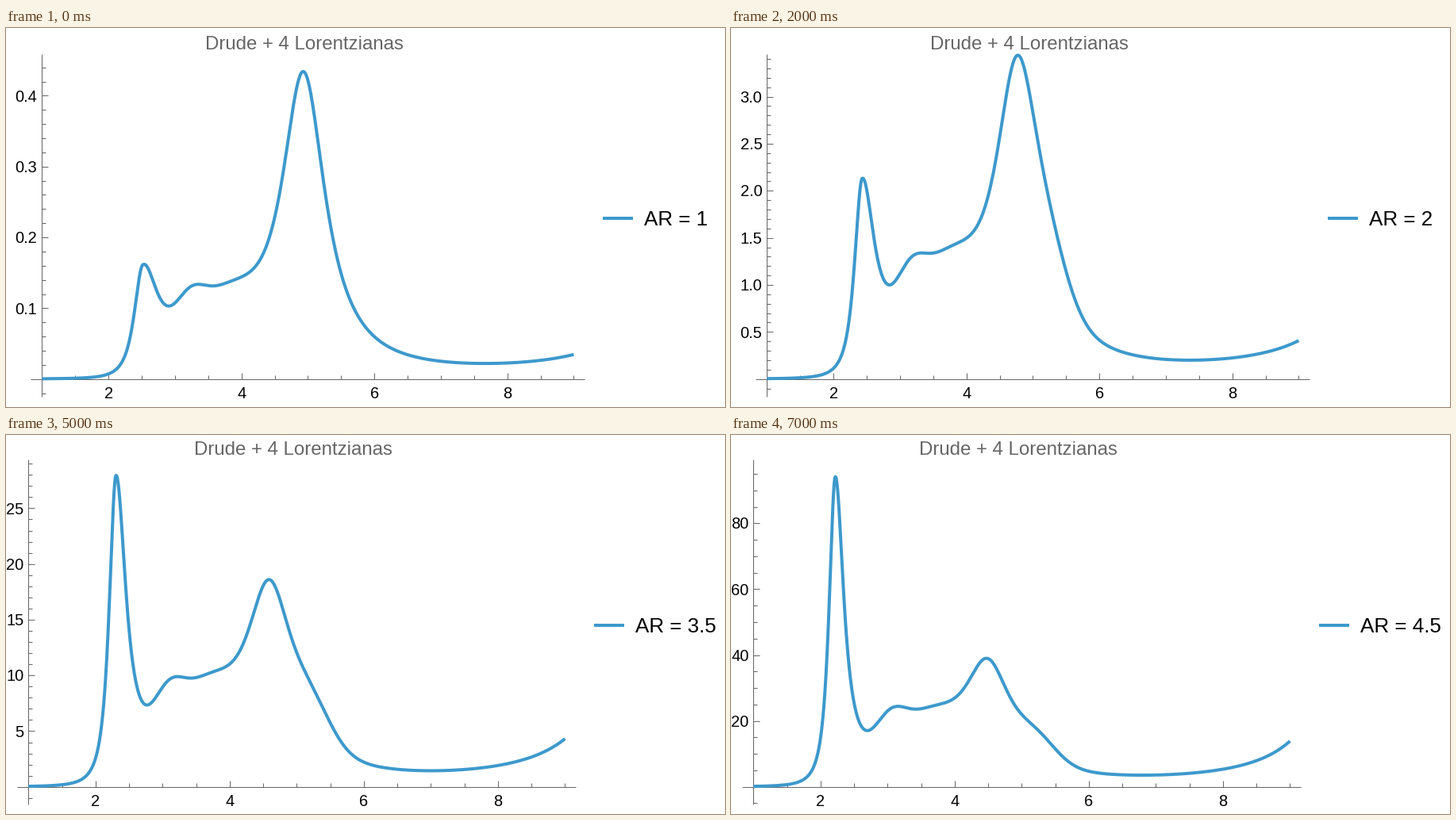
A matplotlib script for the animation above (8000 ms loop, 906 by 478 pixels).

```python
import numpy as np
import matplotlib.pyplot as plt
from matplotlib.animation import FuncAnimation

W, H, DPI = 906, 478, 100
PX = 72 / DPI
BLUE, GRAY = (0.24, 0.6, 0.8), "#666666"
plt.rcParams["font.family"] = "Liberation Sans"

# aspect ratio, axis x, axis y, axis top, pixels per unit, major and minor step
SCENES = [
    (1, 45.4, 442.7, 33, 893.3, 0.1, 0.02),
    (1.5, 34.4, 442.7, 33, 282.4, 0.2, 0.05),
    (2, 45.4, 442.7, 33, 118.7, 0.5, 0.1),
    (2.5, 17.4, 447.7, 28, 61.6, 1, 0.2),
    (3, 39.4, 447.7, 35, 29.23, 2, 0.5),
    (3.5, 28.4, 443.7, 30.5, 14.05, 5, 1),
    (4, 39.4, 443.7, 30.5, 7.36, 10, 2),
    (4.5, 28.4, 443.7, 30.5, 4.155, 20, 5),
]
TITLE_Y = {442.7: 27, 447.7: 22, 443.7: 25}

ENERGY = np.linspace(1, 9, 1600)


def lorentz(e, center, width, power=1):
    return (1 + ((e - center) / width) ** 2) ** -power


def gauss(e, center, width):
    return np.exp(-((e - center) / width) ** 2 / 2)


def spectrum(e, ratio):
    """Two resonances, interband bumps, a shoulder and a far pole."""
    log = np.log(ratio)
    u = (ratio - 1) / 3.5
    s = u ** 0.75

    def grow(a, c0, c1=0, c2=0):
        return a * ratio ** (c0 + c1 * log + c2 * log ** 2)

    def shift(a, b):
        return a + (b - a) * s

    first = 2.516 - 0.296 * u
    peak = np.where(e < first,
                    lorentz(e, first, shift(0.2, 0.142), 1.5),
                    lorentz(e, first, shift(0.28, 0.155)))
    pole = shift(11.4, 10.44)
    rest = (
        grow(0.4232, 2.71, 0.385, -0.149) * lorentz(e, shift(4.934, 4.49), shift(0.403, 0.45))
        + grow(0.0784, 3.226, 0.385, -0.149) * gauss(e, shift(3.75, 3.6), shift(0.5, 0.42))
        + grow(0.0392, 3.2, 0.36) * gauss(e, shift(3.22, 3.03), shift(0.22, 0.24))
        + grow(0.1453, 2.694) * (1 - 1 / ratio) * gauss(e, 5.22, 0.3)
        + grow(0.0302, 3.27, 0.523) * ((pole - 9) / (pole - e)) ** 2
    )
    onset = 1 / (1 + np.exp((first - e) / 0.08))
    return grow(0.1525, 3.017, 1.263, -0.288) * peak + rest * onset


fig = plt.figure(figsize=(W / DPI, H / DPI), dpi=DPI, facecolor="white")
ax = fig.add_axes([0, 0, 1, 1])


def line(x, y, color=GRAY, width=1):
    ax.plot(x, y, color=color, lw=width * PX, solid_capstyle="butt",
            solid_joinstyle="round")


def label(x, y, s, size, ha="center", color="black"):
    ax.text(x, y, s, fontsize=size * PX, ha=ha, va="baseline", color=color)


def draw(i):
    ratio, x0, y0, top, unit, major, minor = SCENES[i]
    ax.clear()
    ax.set_xlim(0, W)
    ax.set_ylim(H, 0)
    ax.axis("off")

    shift = -11 if ratio % 1 else 0
    x9 = 715.4 + shift
    per_ev = (x9 - x0) / 8
    bottom = y0 + 22.3

    line([x0 - 14.3, x9 + 13.7], [y0, y0])
    line([x0, x0], [top, bottom])
    for k in range(3, 19):
        x = x0 + (k / 2 - 1) * per_ev
        big = k % 4 == 0
        line([x, x], [y0, y0 - (8 if big else 5)])
        if big:
            label(x, y0 + 24.3, str(k // 2), 20)

    every = round(major / minor)
    gap = minor * unit
    for k in range(-int((bottom - y0) / gap), int((y0 - top) / gap) + 1):
        if k == 0:
            continue
        y = y0 - k * gap
        big = k % every == 0
        line([x0, x0 + (8 if big else 5)], [y, y])
        if big:
            label(x0 - 6, y + 7.2, f"{k * minor:.{1 if major < 1 else 0}f}", 20, "right")

    line(x0 + (ENERGY - 1) * per_ev, y0 - spectrum(ENERGY, ratio) * unit, BLUE, 4)
    label((x0 + x9) / 2 - 4.3, TITLE_Y[y0], "Drude + 4 Lorentzianas", 24, color=GRAY)
    line([752 + shift, 790 + shift], [239.8, 239.8], BLUE, 4)
    label(804 + shift, 249.2, f"AR = {ratio:g}", 26, "left")
    return []


anim = FuncAnimation(fig, draw, frames=len(SCENES), init_func=lambda: [],
                     interval=1000, repeat=True, repeat_delay=0)
plt.show()
```
